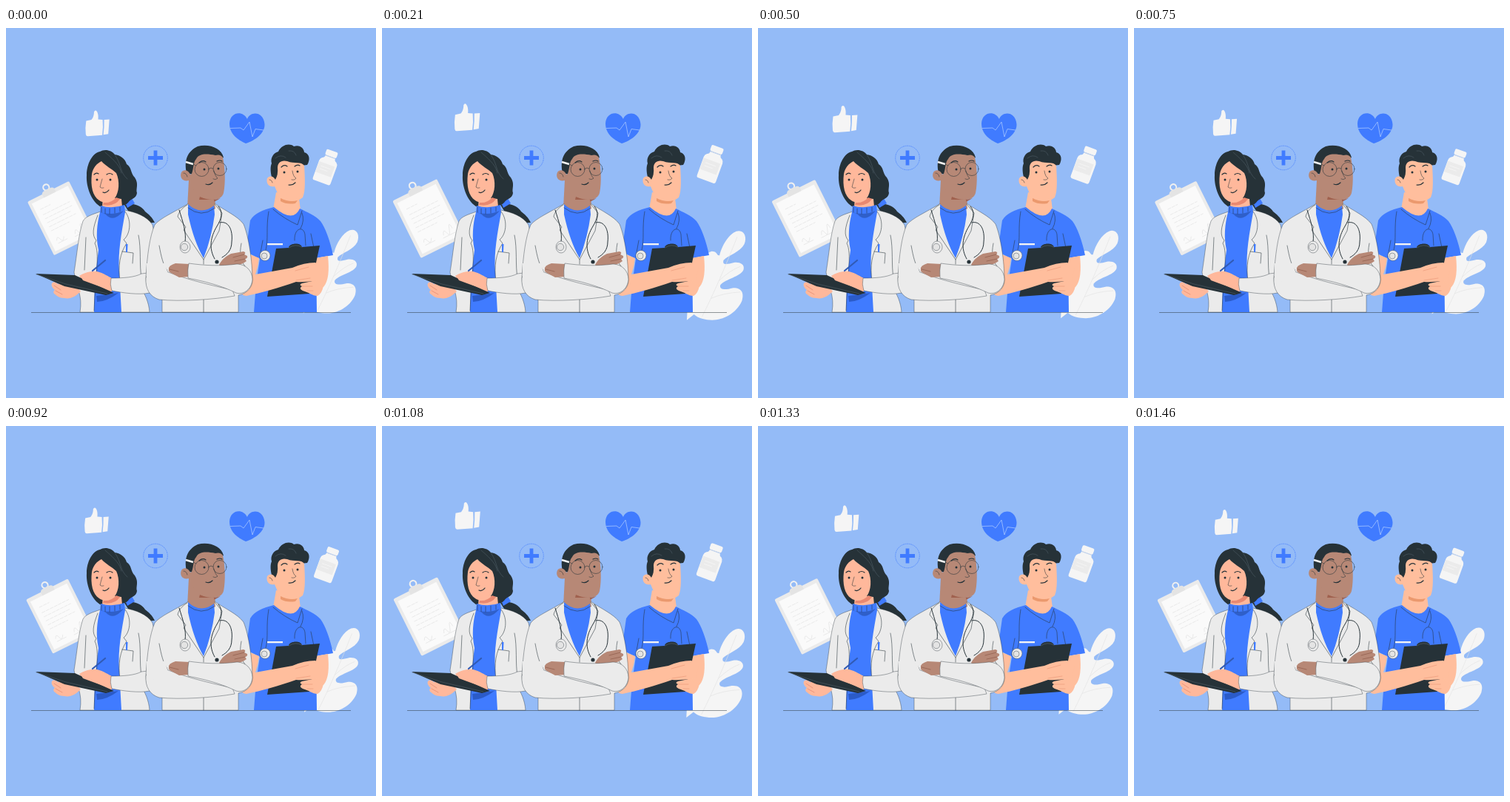
These frames come from a looping animation (500 by 500 pixels, 1.5 s). An HTML page:

```html
<!DOCTYPE html>
<html lang="en">
<head>
<meta charset="utf-8">
<title>Medical team</title>
<style>
  html, body { margin: 0; width: 100%; height: 100%; overflow: hidden; background: #94bbf7; }
  svg { display: block; width: 100vw; height: 100vh; }
  .paper { fill: #f5f5f5; }
  .grey { fill: #e4e4e4; }
  .coat { fill: #ebebeb; }
  .blue { fill: #407bff; }
  .dark { fill: #263238; }
  .skin { fill: #ffbe9d; }
  .rosy { fill: #ffb89b; }
  .brown { fill: #b78876; }
  .line { fill: none; stroke: #263238; stroke-width: .55; stroke-linecap: round; stroke-linejoin: round; }
  .bold { stroke-width: 1.2; }
  .faint { fill: none; stroke: #e2e2e2; stroke-width: .6; }
  .edge { stroke: #263238; stroke-width: .4; }
</style>
</head>
<body>
<svg viewBox="0 0 500 500">
  <g id="props">
    <g id="thumb" class="paper">
      <path d="M110 127L117 125.500C120 122 120.500 118 120.500 115Q121.500 112.500 123.500 113.500C126 116 126.500 121 126 125L132 125.500Q133 136 131.500 146L112 147.500Q110 147.500 109.500 145Q108.500 136 110 127Z"/>
      <path d="M134 125.500L141 125L139.500 144.500L133 145.500Q134.300 135 134 125.500Z"/>
    </g>
    <g id="chart" transform="translate(31.5 235) rotate(-26.5)">
      <rect class="coat" width="62" height="80" rx="2"/>
      <rect x="4" y="5" width="54" height="71" fill="#fafafa"/>
      <circle cx="31" cy="-6" r="4" fill="none" stroke="#f0f0f0" stroke-width="2"/>
      <path class="grey" d="M22 5V0Q23-3 27-3H35Q39-3 40 0V5Z"/>
      <path class="faint" d="M11 17H26M11 25H51M11 31H51M11 37H46M11 43H51M11 49H38" stroke-dasharray="5 1"/>
      <path class="faint" d="M12 64q3-7 5 0t6-1M12 68h14M38 67q3-9 5-1t5-3t4 1M36 70h17"/>
    </g>
    <g id="bottle" transform="translate(430.5 190.5) rotate(20)">
      <rect class="paper" x="-8" y="-25" width="16" height="8" rx="2"/>
      <path class="paper" d="M-7-16H7Q7-13 10-12Q12.500-10 12.500-7V17Q12.500 20 10 20H-10Q-12.500 20-12.500 17V-7Q-12.500-10-10-12Q-7-13-7-16Z"/>
      <path class="faint" d="M-7-16.500H7"/>
      <rect class="coat" x="-12" y="-6" width="22" height="15"/>
      <path d="M-8-1H6M-8 3H3" fill="none" stroke="#f5f5f5" stroke-width=".8"/>
    </g>
    <g id="leaf">
      <path class="paper" d="M400 384L404 310L431 298C439 298 437 304 441 303C444 291 452 277 462 273C471 270 476 279 472 289C467 299 452 303 446 309C444 316 451 314 459 312C466 311 473 314 471 321C467 330 449 332 442 340C440 347 450 346 457 344C465 343 473 347 469 360C462 376 445 384 432 384C423 384 414 382 409 377Z"/>
      <path class="faint" d="M419 380C434 350 448 318 463 280M430 357Q446 350 467 349M440 335Q455 321 467 317"/>
    </g>
  </g>

  <g id="plus">
    <circle cx="202" cy="175.500" r="16.300" fill="none" stroke="#407bff" stroke-width=".6" stroke-dasharray="2 .6"/>
    <path d="M192 175.500H212M202 165.500V185.500" stroke="#407bff" stroke-width="4.800"/>
  </g>
  <g id="heart">
    <path class="blue" d="M326 123C320 111 303 113 302 129C302 143 313 151 324 156C337 152 350 142 349.500 130C348 112 330 112 326 123Z"/>
    <path d="M303 135.500L317 135L321 138L329 127L333 147L337 136.500L348 138" fill="none" stroke="#b5d0ff" stroke-width=".7"/>
  </g>

  <g id="woman">
    <path class="dark" d="M160 239C174 235 184 242 188 248C194 253 197 255 201 263C188 264 174 260 165 247Z"/>
    <path class="blue" d="M161 236L170 230L174 237L164 243Z"/>
    <path class="dark" d="M127 167C133 163 143 165 147 171C154 172 161 176 163 184C170 188 168 196 174 202C180 211 175 217 177 223C176 231 169 230 165 236C160 241 155 241 150 240L129 242C116 236 108 215 109 199C109 183 117 169 127 167Z"/>
    <path class="rosy" d="M131 228L156 231L157 242Q143 247 130 242Z"/>
    <path class="rosy" d="M116 197C118 188 123 183 129 180C135 187 143 190 149 196C154 207 153 222 147 230C141 237 132 237 126 233C117 227 114 214 116 197Z"/>
    <path d="M132 236Q142 237 149 229L154 231Q147 242 131 239Z" fill="#e98971"/>
    <g class="line">
      <path class="bold" d="M119 198q3-3 6-1M136 198q4-3 8 0M131 222q4 2 8-3"/>
      <path d="M130 204Q128 211 127 215Q129 217 132 216"/>
      <path d="M147 171C157 186 153 194 164 204M134 168C149 181 154 187 156 196" style="stroke:#52606a"/>
    </g>
    <circle class="dark" cx="123" cy="205" r="1.500"/><circle class="dark" cx="141" cy="205" r="1.500"/>
    <path class="coat edge" d="M128 248C116 252 107 255 104 261C98 278 96 306 92 330C95 351 104 361 100 384H194C193 371 188 359 181 350L199 338C201 306 202 282 198 266C190 254 176 249 160 246Z"/>
    <path class="blue" d="M128 240Q143 245 160 239L161 249C156 278 151 302 153 330L156 384H119C119 355 121 330 125 300C121 282 123 264 127 249Z"/>
    <path d="M127 249Q144 254 159 247L154 252Q143 262 134 251Z" fill="#2f5fc9"/>
    <path d="M122 362L152 358Q136 370 123 370Z" fill="#2b5bc8"/>
    <path class="line" d="M129 242v7M134 244v7M140 244v7M147 243v7M154 242v6M124 253C117 271 116 280 122 287L120 291C127 304 121 335 119 382M161 248C171 261 167 280 159 286L163 291C154 304 151 322 154 342M157 302L172 304L171 318M108 283L106 327M179 280C183 299 180 321 183 337"/>
    <path class="blue" d="M162 292L164.500 292L164 303L162 303Z"/>
    <path class="rosy" d="M62 345C65 342 68 344 71 347L70 342Q73 339 78 343C85 344 97 350 101 356C95 362 87 367 79 365C72 365 69 362 65 359Q63 356 66 354Q60 349 62 345Z"/>
    <path class="line" d="M65 348L74 354M67 355L76 360" style="stroke:#d87c63"/>
    <path class="rosy" d="M99 335C105 331 115 328 123 329C132 331 138 336 145 339L143 356C130 356 112 349 104 343Z"/>
    <path class="dark" d="M40 332L93 334L146 358L135 361L79 349Z"/>
    <path class="rosy" d="M101 336Q109 332 117 332L132 339L141 340L140 354Q120 347 104 341Z"/>
    <path class="line" d="M41 333L81 346L137 359" style="stroke:#52606a"/>
    <path d="M134 314L117 328" stroke="#315bb5" stroke-width="2.200" stroke-linecap="round"/>
    <path class="coat edge" d="M142 338C158 338 174 337 183 332L200 330C201 343 200 353 194 358C180 361 158 358 143 355Q140 346 142 338Z"/>
  </g>

  <g id="nurse">
    <path class="skin" d="M365 222L396 230L398 246Q385 265 361 245Z"/>
    <path class="dark" d="M360 205C357 195 357 187 359 183C357 176 361 169 368 167C372 158 383 155 389 160C397 157 403 163 403 168C411 170 411 179 407 185L398 186L364 205Z"/>
    <path class="skin" d="M367 189C367 182 372 178 380 180C390 184 399 180 403 186C404 203 405 220 401 229C391 237 376 236 369 228L363 214C355 216 351 209 353 203C357 198 362 201 364 205Q368 198 367 189Z"/>
    <path d="M371 230Q383 236 394 233L391 237Q379 239 371 234Z" fill="#eb996e"/>
    <g class="line">
      <path class="bold" d="M372 188q4-4 8-1M390 187q4-3 7-1M382 212q5 1 9-3"/>
      <path d="M387 193Q388 201 392 203Q390 206 386 205M356 205q3 0 4 4"/>
      <path d="M364 176q7-6 14-1M382 166q8-1 10 6" style="stroke:#52606a"/>
    </g>
    <circle class="dark" cx="376" cy="195" r="1.500"/><circle class="dark" cx="394" cy="194" r="1.500"/>
    <path class="blue" d="M362 242C347 246 336 250 330 260L324 302L343 312L338 345L335 384H420L419 311L442 307C438 287 431 269 425 261C418 253 407 249 397 244Q388 264 362 242Z"/>
    <path class="line" d="M361 245Q376 258 394 266L400 247M355 248C351 270 355 285 351 300M412 278L419 311M343 309L347 287M390 287C389 270 402 267 404 279L405 294M400 250Q404 260 398 271"/>
    <rect x="353" y="291" width="21" height="2.300" fill="#f5f5f5"/>
    <circle class="coat edge" cx="350" cy="307.500" r="7"/><circle class="grey edge" cx="349" cy="308" r="4"/>
    <path class="skin" d="M418 311L435 308C437 327 436 342 429 350C420 355 410 347 402 340L418 330Z"/>
    <path class="dark" d="M365 298L382 297C382 291 398 289 400 296L424 294L410 359L353 363Z"/>
    <path class="line" d="M382 297Q391 291 400 296" style="stroke:#667077"/>
    <path class="skin" d="M325 304L342 311Q341 322 337 333L387 324Q403 317 418 317L428 325L424 341C412 342 402 344 392 343C369 351 345 358 325 362Q318 362 316 354C314 338 319 321 325 304Z"/>
    <path class="skin" d="M400 345L414 342L429 348Q427 359 421 362C414 362 409 357 401 355Q395 352 400 349Q395 347 400 345Z"/>
    <path class="line" d="M391 328L409 323M392 341L411 338M400 349L414 349M407 355L415 355" style="stroke:#e58f70"/>
  </g>

  <g id="doctor">
    <path class="brown" d="M247 205L281 225L284 244Q265 261 245 244Z"/>
    <path class="dark" d="M244 196C240 178 246 166 259 160C274 156 291 162 294 175L287 178L253 198Z"/>
    <path class="brown" d="M251 197C254 188 253 181 257 177C261 169 272 170 283 172Q290 170 293 175C296 187 297 209 294 223C291 234 276 233 267 230C256 224 250 215 247 206C239 208 234 202 237 195C240 190 247 192 249 198Z"/>
    <path d="M262 228Q277 235 290 230L281 235Q269 236 261 232Z" fill="#a0614e"/>
    <path d="M243 181L253 184" stroke="#f5f5f5" stroke-width="2.600"/>
    <g class="line">
      <circle cx="264.500" cy="191" r="9.500"/><circle cx="289" cy="190.500" r="9"/>
      <path d="M253 184L257 186M274 190q3-2 6 0M240 196q4 0 5 5M281 193Q283 201 286 203Q283 206 280 204"/>
      <path class="bold" d="M261 182q5-4 9-1M285 180q4-2 7 0M270 211q5 2 9-2"/>
    </g>
    <circle class="dark" cx="268" cy="191" r="1.500"/><circle class="dark" cx="287" cy="190" r="1.500"/>
    <path class="coat edge" d="M245 238C229 248 208 257 201 266C194 282 191 307 189 336C189 354 197 363 211 367V384H314V361C326 359 333 350 333 341C333 315 328 282 321 265C313 254 296 247 282 237Z"/>
    <path class="brown" d="M247 232L281 232L283 244Q264 256 246 244Z"/>
    <path class="blue" d="M246 238Q263 254 281 240L282 252Q278 283 267 311Q254 289 246 252Z"/>
    <path class="line" d="M246 243Q264 257 281 244M245 239C238 243 233 249 232 255L243 269L240 273L267 313M282 238L292 250L288 274L267 313V319M267 366V384M207 294C210 310 212 319 218 328M318 291C315 307 317 314 323 322"/>
    <path class="line" d="M287 241C294 249 291 258 285 268C276 283 274 298 282 312M289 263C300 260 307 272 305 289C305 300 299 306 292 310M234 246C239 262 244 276 242 289" style="stroke-width:1"/>
    <circle class="dark" cx="285" cy="316" r="2.600"/>
    <ellipse class="coat edge" cx="242" cy="296" rx="7" ry="8"/><circle class="grey edge" cx="241" cy="296" r="4.700"/>
    <path class="brown" d="M288 320C292 312 298 308 304 305L321 302Q325 303 322 306L326 308Q327 311 323 312L325 315C318 321 304 323 290 323Z"/>
    <path class="line" d="M307 310L322 306M309 315L323 312" style="stroke:#83503f"/>
    <path class="coat edge" d="M189 338C192 327 204 325 217 329C239 338 269 346 306 354L309 362C281 367 235 370 207 367C194 363 188 352 189 338Z"/>
    <path class="coat" d="M190 318H215L219 334L190 346Z"/>
    <path class="brown" d="M248 319L229 318Q219 321 220 326Q219 329 223 331L234 337L248 336Z"/>
    <path class="line" d="M221 326L233 329" style="stroke:#83503f"/>
    <path class="coat edge" d="M247 318C268 321 290 322 312 319C324 319 333 328 333 340C332 352 322 361 311 358C291 348 267 342 246 338Q245 327 247 318Z"/>
  </g>
  <path d="M34 384.500H466" stroke="#263238" stroke-width=".5"/>
</svg>
<script>
  const LOOP = 1500, FRAME = LOOP / 36;
  // Uneven double pulse: [time in ms, scale], joined by straight segments
  const pulse = [[-37, 1], [272, 1.1], [853, 1], [1160, 1.1], [1463, 1], [1772, 1.1]];
  const props = document.getElementById('props');

  function scaleAt(t) {
    const i = pulse.findIndex(([time]) => time > t);
    const [t0, s0] = pulse[i - 1], [t1, s1] = pulse[i];
    return s0 + (s1 - s0) * (t - t0) / (t1 - t0);
  }

  function draw(now) {
    const step = Math.floor(((now % LOOP) + 4) / FRAME) % 36;
    const k = scaleAt(step * FRAME);
    props.setAttribute('transform', `translate(250 250) scale(${k}) translate(-250 -250)`);
    requestAnimationFrame(() => draw(performance.now() - start));
  }

  const start = performance.now();
  draw(0);
</script>
</body>
</html>
```
